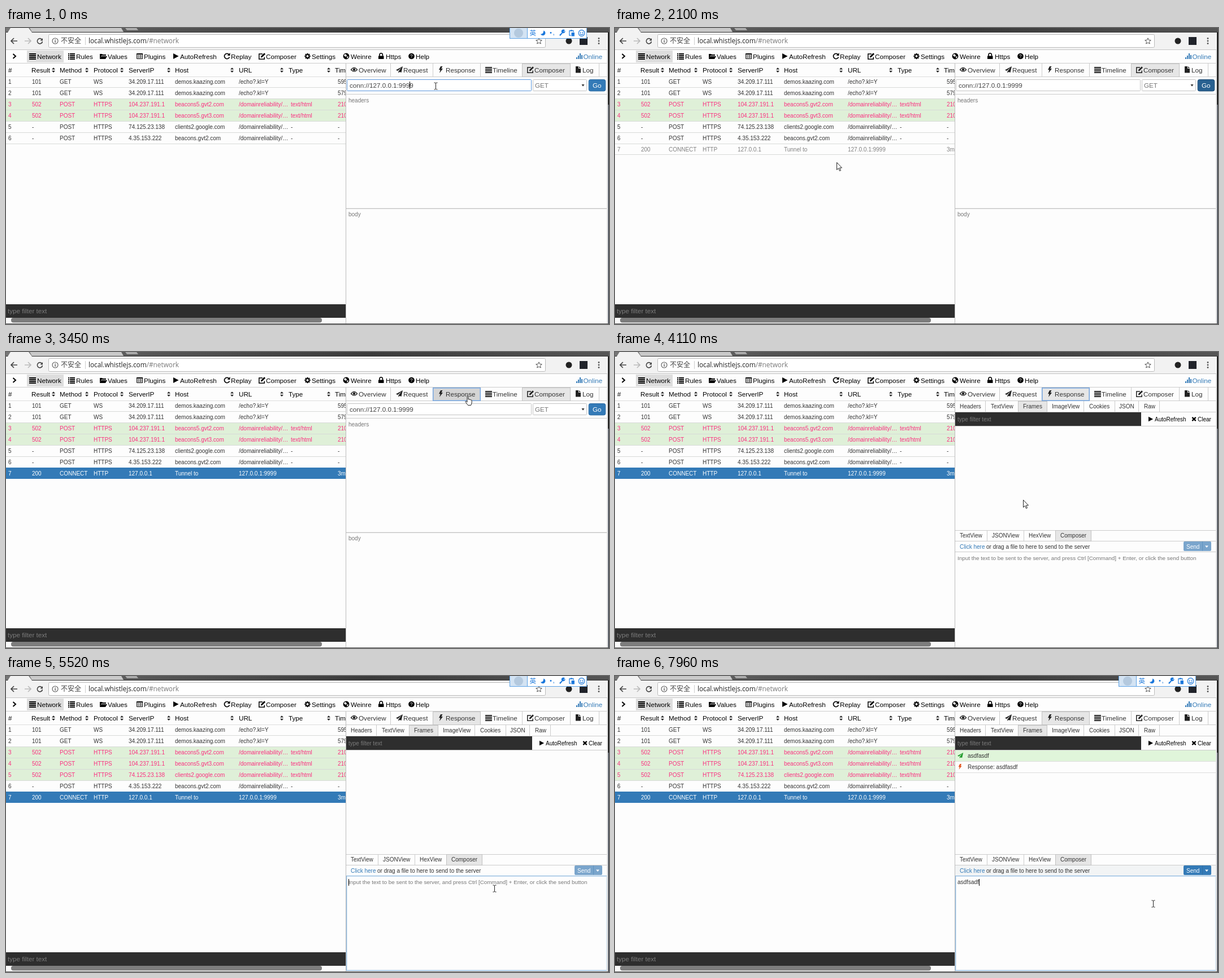
Animation of 1067x525 px, one loop 8000 ms. Source, as an HTML page with a canvas:

```html
<!DOCTYPE html>
<html lang="en">
<head>
<meta charset="utf-8">
<title>Network composer</title>
<style>
html, body { margin: 0; width: 100%; height: 100%; overflow: hidden; background: #fff; }
canvas { display: block; }
</style>
</head>
<body>
<canvas id="stage" width="1067" height="525"></canvas>
<script>
const ctx = document.getElementById('stage').getContext('2d');
const LOOP = 8000;
const SANS = '"Liberation Sans", Arial, sans-serif';
const UI = '"Open Sans", "Noto Sans CJK SC", sans-serif';
const CJK = '"Noto Sans CJK SC", "Noto Sans CJK", sans-serif';
const BIG = 11.67, SMALL = 10;
const BLUE = '#337ab7', LINE = '#ccc', PINK = '#fb2f80', DARK = '#2e2e2e', HINT = '#7c7c7c';

// Moments at which the interface changes
const AT = {
  goPress: 1070, goRelease: 1220, newRow: 1670, rowClick: 2730,
  tabHover: 3330, tabPress: 3450, panel: 3720, focus: 4770, rowFail: 5100,
  barTint: 5820, typed: 7360, sent: 7510, reply: 7660, typeAgain: 7810, typedAgain: 7960
};

// Pointer poses: time, x, y, shape; each one holds until the next
const POINTER = [
  [0, 760, 103, 'beam'], [150, 790, 104, 'beam'], [340, 862, 104, 'beam'],
  [520, 940, 102, 'arrow'], [700, 1000, 103, 'arrow'], [890, 1043, 104, 'hand'],
  [1530, 1010, 118, 'arrow'], [1670, 850, 168, 'arrow'], [1800, 655, 212, 'arrow'],
  [1950, 478, 234, 'arrow'], [2100, 392, 238, 'arrow'], [2220, 358, 237, 'arrow'],
  [2370, 338, 235, 'arrow'], [2490, 330, 233, 'arrow'], [2610, 328, 214, 'arrow'],
  [2880, 420, 186, 'arrow'], [3030, 580, 138, 'arrow'], [3180, 735, 96, 'arrow'],
  [3330, 812, 77, 'hand'], [3840, 790, 118, 'arrow'], [3960, 748, 200, 'arrow'],
  [4110, 722, 262, 'arrow'], [4260, 726, 284, 'arrow'], [4380, 752, 322, 'arrow'],
  [4530, 795, 364, 'beam'], [4650, 828, 376, 'beam'], [5070, 846, 377, 'beam'],
  [5370, 858, 377, 'beam'], [5520, 864, 377, 'beam'], [5820, 950, 362, 'beam'],
  [5940, 1028, 345, 'arrow'], [6470, 950, 402, 'beam'], [6620, 919, 419, 'beam'],
  [7510, 952, 404, 'beam']
];

// Icons in a 12-unit box: filled path, stroked path, line width
const ICONS = {
  bars: ['M0 1h12v2H0zM0 4h12v2H0zM0 7h12v2H0zM0 10h12v2H0z'],
  bullets: ['M0 1h2v2H0zM3 1h9v2H3zM0 4h2v2H0zM3 4h9v2H3zM0 7h2v2H0zM3 7h9v2H3zM0 10h2v2H0zM3 10h9v2H3z'],
  folder: ['M0 11V2h4l1 1h6v2H3zM3 6h10l-3 5H0z'],
  card: ['M2 4h2v1H2zM5 4h4v1H5zM2 6h2v1H2zM5 6h4v1H5zM2 8h2v1H2zM5 8h4v1H5zM0 1h11v2H0z', 'M.5 1.5h10v9H.5z', 1],
  play: ['M0 1l9.5 5L0 11z'],
  refresh: ['M11.5 0v5h-5z', 'M9.6 3A4.6 4.6 0 1 0 10.4 7.5', 1.7],
  edit: ['M4 6.3L10 .3l2 2-6 6H4z', 'M7 2H.8v9.2h9.4V7.5', 1.5],
  cog: ['', 'M5.5 3a3 3 0 1 1-.01 0M5.5.8v2M5.5 9.2v2M.3 6h2M8.7 6h2M1.8 2.3l1.4 1.4M7.8 8.3l1.4 1.4M1.8 9.7l1.4-1.4M7.8 3.7l1.4-1.4', 2.1],
  globe: ['M6 .6a5.4 5.4 0 1 1-.01 0M4 2L2 4l1 2 3 1 1-2-1-2zM8 6l-1 3 1 1 2-3z'],
  lock: ['M0 5.5h9.5V11H0z', 'M2 6V3.5a2.7 2.7 0 0 1 5.4 0V6', 1.6],
  disc: ['M5.5.7a5.3 5.3 0 1 1-.01 0'],
  stats: ['M0 8h2v3H0zM3 5h2v6H3zM6 1h2v10H6zM9 4h2v7H9z'],
  eye: ['M6 3.5a2.3 2.3 0 1 1-.01 0', 'M.5 6Q6-1.2 11.5 6Q6 12.2.5 6z', 1.3],
  plane: ['M12 0L0 6.5l3 1.5L10 2 4.5 8.8V12l2-2.3L9.5 11z'],
  bolt: ['M5 0h3.5L6.3 4H9L3 12l1.5-5.8H2z'],
  file: ['M0 0h5v4h4v7.5H0zM6 0l3 3H6z'],
  cross: ['', 'M1.5 2.5l7 7M8.5 2.5l-7 7', 2.5],
  moon: ['M7 1a5 5 0 1 1-6 7Q7 8 7 1z'],
  wrench: ['M11 1L8.5 3.5 9 4l2.5-2a3.4 3.4 0 0 1-4.5 4L3 11 1 9.5 5.5 5A3.3 3.3 0 0 1 11 1z'],
  clip: ['M3 0h4v2H3zM5 5h6v7H5z', 'M4 10.5H1v-9h8V4', 1.3],
  smile: ['M3 4h2v1.5H3zM7 4h2v1.5H7z', 'M6 .6a5.4 5.4 0 1 1-.01 0M3 7q3 3.5 6 0', 1.2],
  star: ['', 'M6 .8l1.5 3.6 3.8.3-2.9 2.5.9 3.8L6 9l-3.3 2 .9-3.8L.7 4.7l3.8-.3z', 1],
  reload: ['M11 1v4.5H6.5z', 'M9.6 3.4A4.6 4.6 0 1 0 10.5 7', 1.6],
  back: ['', 'M12 6H1.5M6 1L1 6l5 5', 1.7],
  forward: ['', 'M0 6h10.5M6 1l5 5-5 5', 1.7],
  chevron: ['', 'M1.5 2L6 6l-4.5 4', 2]
};

function rect(x, y, w, h, color) {
  ctx.fillStyle = color;
  ctx.fillRect(x, y, w, h);
}

function frame(x, y, w, h, color) {
  ctx.strokeStyle = color;
  ctx.lineWidth = 1;
  ctx.strokeRect(x + .5, y + .5, w - 1, h - 1);
}

function round(x, y, w, h, r, fill, stroke) {
  ctx.beginPath();
  ctx.roundRect(x, y, w, h, r);
  if (fill) { ctx.fillStyle = fill; ctx.fill(); }
  if (stroke) { ctx.strokeStyle = stroke; ctx.lineWidth = 1; ctx.stroke(); }
}

function poly(color, ...points) {
  ctx.fillStyle = color;
  ctx.beginPath();
  points.forEach(p => ctx.lineTo(...p));
  ctx.fill();
}

function disc(x, y, r, color) {
  ctx.fillStyle = color;
  ctx.beginPath();
  ctx.arc(x, y, r, 0, 7);
  ctx.fill();
}

// Text is placed by the vertical middle of its capitals
function text(s, x, mid, size = SMALL, color = '#333', family = SANS) {
  ctx.font = `${size}px ${family}`;
  ctx.fillStyle = color;
  ctx.fillText(s, x, mid + size * .36);
}

function icon(name, x, mid, color = '#000', scale = 1) {
  const [fill, stroke, width] = ICONS[name];
  ctx.save();
  ctx.translate(x, mid - 6 * scale);
  ctx.scale(scale, scale);
  ctx.fillStyle = ctx.strokeStyle = color;
  if (fill) ctx.fill(new Path2D(fill), 'evenodd');
  if (stroke) { ctx.lineWidth = width; ctx.stroke(new Path2D(stroke)); }
  ctx.restore();
}

function drawBrowser() {
  const caption = ctx.createLinearGradient(0, 0, 1067, 0);
  caption.addColorStop(0, '#777');
  caption.addColorStop(.25, '#555');
  caption.addColorStop(.6, '#3a3a3a');
  caption.addColorStop(1, '#555');
  rect(0, 0, 1067, 8, caption);
  poly('#c9c9c9', [42, 0], [204, 0], [208, 7], [46, 7]);
  poly('#aaa', [211, 0], [231, 0], [234, 4], [214, 4]);
  rect(0, 7, 1067, 1, '#333');
  poly('#f2f2f2', [8, 0], [40, 0], [46, 8], [3, 8]);

  rect(0, 8, 1064, 30, '#f2f2f2');
  rect(0, 38, 1064, 1, '#c4c4c4');
  round(75.5, 11.5, 879, 23, 2, '#fff', '#bbb');
  icon('back', 8, 23, '#444');
  icon('forward', 33, 23, '#bbb');
  icon('reload', 54, 23, '#444');
  ctx.strokeStyle = '#555';
  ctx.lineWidth = 1.1;
  ctx.beginPath();
  ctx.arc(87, 23, 5, 0, 7);
  ctx.stroke();
  rect(86.4, 22, 1.3, 4, '#555');
  rect(86.4, 20, 1.3, 1.3, '#555');
  text('不安全', 97, 23, 12, '#444', CJK);
  rect(140, 16, 1, 14, '#ccc');
  text('local.whistlejs.com', 146, 23, 11.8, '#222', UI);
  const x = 146 + ctx.measureText('local.whistlejs.com').width;
  text('/#network', x, 23, 11.8, '#777', UI);
  icon('star', 937, 23, '#555');
  disc(996, 23, 5.5, '#222');
  rect(1015, 16, 14, 14, '#20232a');
  for (const y of [18.5, 23, 27.5]) disc(1049, y, 1.4, '#555');
}

function drawMenu() {
  rect(0, 39, 1064, 23, '#fdfdfd');
  rect(0, 62, 1064, 1, LINE);
  rect(37, 40, 65, 21, '#ddd');
  icon('chevron', 11, 50);
  const items = [
    ['bars', 41, 'Network', 55], ['bullets', 110, 'Rules', 124], ['folder', 166, 'Values', 180],
    ['card', 231, 'Plugins', 244], ['play', 296, 'AutoRefresh', 308], ['refresh', 385, 'Replay', 398],
    ['edit', 447, 'Composer', 460], ['cog', 528, 'Settings', 541], ['globe', 596, 'Weinre', 610],
    ['lock', 659, 'Https', 672], ['disc', 712, 'Help', 725]
  ];
  for (const [name, x, label, tx] of items) {
    icon(name, x, 50);
    text(label, tx, 50.5, BIG, '#000');
  }
  text('?', 715, 50, 8.5, '#fff');
  icon('stats', 1009, 50, BLUE);
  text('Online', 1021.5, 50.5, BIG, BLUE);
}

const COLUMNS = [4, 46, 95, 155, 217, 299, 412, 504, 587];
const HEADS = [['#', 4], ['Result', 45], ['Method', 95], ['Protocol', 155], ['ServerIP', 217],
  ['Host', 299], ['URL', 412], ['Type', 500], ['Time', 582]];
const REPORT = '/domainreliability/…';
const failed = (ip, host) => ['502', 'POST', 'HTTPS', ip, host, REPORT, 'text/html', '210ms'];
const pending = (ip, host) => ['-', 'POST', 'HTTPS', ip, host, REPORT, '-', '-'];
const socket = ms => ['101', 'GET', 'WS', '34.209.17.111', 'demos.kaazing.com', '/echo?.kl=Y', '', ms];

function drawTable(t) {
  ctx.save();
  ctx.beginPath();
  ctx.rect(0, 63, 601, 462);
  ctx.clip();
  HEADS.forEach(([s, x]) => text(s, x, 75, BIG, '#000'));
  for (const x of [84, 143, 205, 288, 400, 488, 571]) {
    poly('#222', [x - 3, 73.5], [x, 70.2], [x + 3, 73.5]);
    poly('#222', [x - 3, 75.8], [x, 79], [x + 3, 75.8]);
  }
  rect(0, 86, 601, 1, '#ddd');
  const fifth = ['74.125.23.138', 'clients2.google.com'];
  const rows = [
    socket('595ms'), socket('579ms'),
    failed('104.237.191.1', 'beacons5.gvt2.com'),
    failed('104.237.191.1', 'beacons5.gvt3.com'),
    t < AT.rowFail ? pending(...fifth) : failed(...fifth),
    pending('4.35.153.222', 'beacons.gvt2.com')
  ];
  if (t >= AT.newRow) rows.push(['200', 'CONNECT', 'HTTP', '127.0.0.1', 'Tunnel to', '127.0.0.1:9999', '', '3ms']);
  rows.forEach((cells, i) => {
    const top = 86 + i * 19.9, bad = cells[0] === '502', tunnel = i === 6;
    const picked = tunnel && t >= AT.rowClick;
    const y = Math.round(top);
    if (bad) rect(0, y, 601, 20, '#dff0d8');
    if (picked) rect(0, y, 601, 20, BLUE);
    rect(0, y + 19, 601, 1, picked ? BLUE : '#d8dad8');
    const color = picked ? '#fff' : bad ? PINK : tunnel ? '#808080' : '#333';
    [i + 1, ...cells].forEach((s, c) => text(s, COLUMNS[c], top + 9.7, SMALL, color));
  });
  rect(0, 490, 601, 24, DARK);
  text('type filter text', 3, 502, BIG, HINT);
  rect(0, 514, 601, 9, '#fafafa');
  round(9, 514, 550, 8.5, 4, '#7d7d7d');
  ctx.restore();
}

function activeTab(x, y, w, h, color = '#e6e6e6') {
  rect(x, y, w, h, color);
  frame(x, y, w, h, '#c2c2c2');
}

function drawTabs(t) {
  rect(602, 63, 462, 23, '#fdfdfd');
  rect(602, 86, 462, 1, LINE);
  const edges = [680, 755, 839, 913, 998, 1049];
  edges.forEach(x => rect(x, 63, 1, 23, LINE));
  const onResponse = t >= AT.panel;
  if (!onResponse) activeTab(913, 63, 86, 24);
  if (t >= AT.tabHover) {
    activeTab(755, 63, 85, 24, t >= AT.tabPress && !onResponse ? '#d4d4d4' : '#e6e6e6');
    if (t >= AT.tabPress && t < AT.focus) {
      frame(755, 63, 85, 24, '#6f9fd8');
      frame(756, 64, 83, 22, '#a9c3e4');
    }
  }
  const tabs = [['eye', 610, 'Overview', 624], ['plane', 690, 'Request', 703], ['bolt', 764, 'Response', 778],
    ['bars', 848, 'Timeline', 861], ['edit', 922, 'Composer', 935], ['file', 1008, 'Log', 1020]];
  for (const [name, x, label, tx] of tabs) {
    icon(name, x, 74, '#222');
    text(label, tx, 74.5, BIG);
  }
}

function drawComposer(t) {
  const focused = t < AT.goPress;
  round(603.5, 91.5, 326, 20, 1, '#fff', focused ? '#5b97dc' : '#c4c4c4');
  if (focused) rect(714, 95, 1, 13, '#000');
  text('conn://127.0.0.1:9999', 608, 102, BIG, '#444');
  round(932.5, 91.5, 95, 20, 1, '#fff', '#c4c4c4');
  text('GET', 936, 102, BIG, '#777');
  poly('#333', [1018.5, 100], [1023.5, 100], [1021, 103.8]);
  const idle = t < AT.goPress || t >= AT.rowClick;
  const go = idle ? BLUE : t < AT.goRelease ? '#204d74' : '#286090';
  round(1031.2, 91.5, 29.6, 20.4, 3, go, idle ? '#2e6da4' : '#204d74');
  text('Go', 1038, 102, BIG, '#fff');
  rect(602, 117, 462, 1, LINE);
  text('headers', 606, 128, SMALL, '#777');
  rect(602, 319.7, 462, 1.2, '#bbb');
  text('body', 606, 330.5, SMALL, '#777');
}

function subTabs(y, edges, tabs, active) {
  rect(602, y + 19, 462, 1, LINE);
  edges.forEach(x => rect(x, y, 1, 19, LINE));
  activeTab(active[0], y, active[1] - active[0] + 1, 20);
  tabs.forEach(([label, x]) => text(label, x, y + 9.7));
}

function drawMessage(y, name, color, s, bg) {
  rect(602, y, 462, 19, bg);
  rect(602, y + 19, 462, 1, '#ddd');
  icon(name, 606, y + 9, color, .85);
  text(s, 624, y + 9.5);
}

function drawResponse(t) {
  subTabs(87, [655, 713, 764, 829, 884, 926, 963],
    [['Headers', 610], ['TextView', 665], ['Frames', 722], ['ImageView', 773], ['Cookies', 839],
      ['JSON', 892], ['Raw', 936]], [713, 764]);
  rect(602, 107, 329, 24, DARK);
  text('type filter text', 606, 119, SMALL, HINT);
  icon('play', 944, 119, '#000', .85);
  text('AutoRefresh', 955, 119, SMALL, '#000');
  icon('cross', 1020, 119, '#000', .9);
  text('Clear', 1031, 119, SMALL, '#000');
  rect(602, 131, 462, 1, LINE);
  if (t >= AT.sent) drawMessage(132, 'plane', '#1f9a2a', 'asdfasdf', '#e0f5da');
  if (t >= AT.reply) drawMessage(152, 'bolt', '#e2541c', 'Response: asdfasdf', '#fdfdfd');

  rect(602, 316, 462, 1, LINE);
  subTabs(316, [658, 723, 779, 842],
    [['TextView', 610], ['JSONView', 667], ['HexView', 732], ['Composer', 788]], [779, 842]);
  rect(602, 336, 462, 18, t >= AT.barTint ? '#f2f4f5' : '#fdfdfd');
  text('Click here', 610, 345, SMALL, BLUE);
  text('or drag a file to here to send to the server', 657, 345);
  const value = t < AT.typed ? '' : t < AT.sent ? 'asdfasdf' : t < AT.typeAgain ? '' :
    t < AT.typedAgain ? 'asdf' : 'asdfsadf';
  round(1006, 336, 49, 17, 2, value ? BLUE : '#7aa5cc');
  rect(1039, 336, 1, 17, value ? '#2e6da4' : '#5f93c0');
  text('Send', 1011, 345, SMALL, '#fff');
  poly('#fff', [1044, 343.5], [1050, 343.5], [1047, 347]);
  rect(602, 354, 462, 1, LINE);
  const focused = t >= AT.focus;
  if (focused) {
    frame(602, 354, 462, 169, '#8fb9de');
    frame(603, 355, 460, 167, '#d5e6f5');
  }
  if (value) text(value, 606, 365.5);
  else text('Input the text to be sent to the server, and press Ctrl [Command] + Enter, or click the send button',
    606, 365.5, 9.9, '#777');
  if (focused) {
    ctx.font = `${SMALL}px ${SANS}`;
    rect(Math.round(606 + ctx.measureText(value).width), 360, 1, 12, '#000');
  }
}

function drawInputBar() {
  const blue = '#1b78dc';
  rect(891, 0, 137, 18, '#fff');
  rect(891, 0, 31, 18, '#d3e3f3');
  disc(907, 9, 8, '#b4c9de');
  frame(891, -1, 137, 20, '#5ba2e6');
  rect(922, 0, 1, 18, '#5ba2e6');
  text('英', 926.5, 8.5, 11.5, blue, CJK);
  icon('moon', 945, 9, blue, .9);
  disc(964, 8.5, 1.4, blue);
  text(',', 967.5, 8, 12, blue);
  icon('wrench', 978, 9, blue);
  icon('clip', 996, 9, blue, .9);
  icon('smile', 1012.5, 9, blue);
}

const ARROW = new Path2D('M.5.5v13l3-2.8 2 4.8 2-.9-2-4.6h4z');
const HAND = new Path2D('M4 1q1.5-1 2 .5V7q1.3-.8 2 .4 1.5-.7 2 .6 2-.5 2.2 1.2V13l-1.5 4.5H5.5L1 11.5q-.2-1.7 1.5-1L4 12z');
const BEAM = new Path2D('M-3-6h2l1 1 1-1h2M0-5V5M-3 6h2l1-1 1 1h2');

function drawPointer(t) {
  const [, x, y, shape] = POINTER.findLast(p => p[0] <= t);
  ctx.save();
  ctx.translate(x, y);
  ctx.lineWidth = 1;
  ctx.strokeStyle = '#222';
  ctx.fillStyle = '#fff';
  if (shape === 'beam') {
    ctx.translate(.5, 0);
    ctx.stroke(BEAM);
  } else {
    const path = shape === 'hand' ? HAND : ARROW;
    ctx.fill(path);
    ctx.stroke(path);
  }
  ctx.restore();
}

function draw(t) {
  rect(0, 0, 1067, 525, '#fdfdfd');
  drawBrowser();
  drawMenu();
  drawTable(t);
  drawTabs(t);
  if (t < AT.panel) drawComposer(t);
  else drawResponse(t);
  rect(601, 63, 1, 461, '#bbb');
  rect(1063, 39, 1, 485, '#ddd');
  rect(1065, 8, 2, 128, '#1c1c1c');
  rect(1065, 136, 2, 389, '#5c6068');
  rect(0, 524, 1067, 1, '#555');
  if (t < AT.goPress || t >= AT.focus) drawInputBar();
  drawPointer(t);
}

const start = performance.now();
function tick() {
  draw((performance.now() - start) % LOOP);
  requestAnimationFrame(tick);
}
tick();
</script>
</body>
</html>
```
